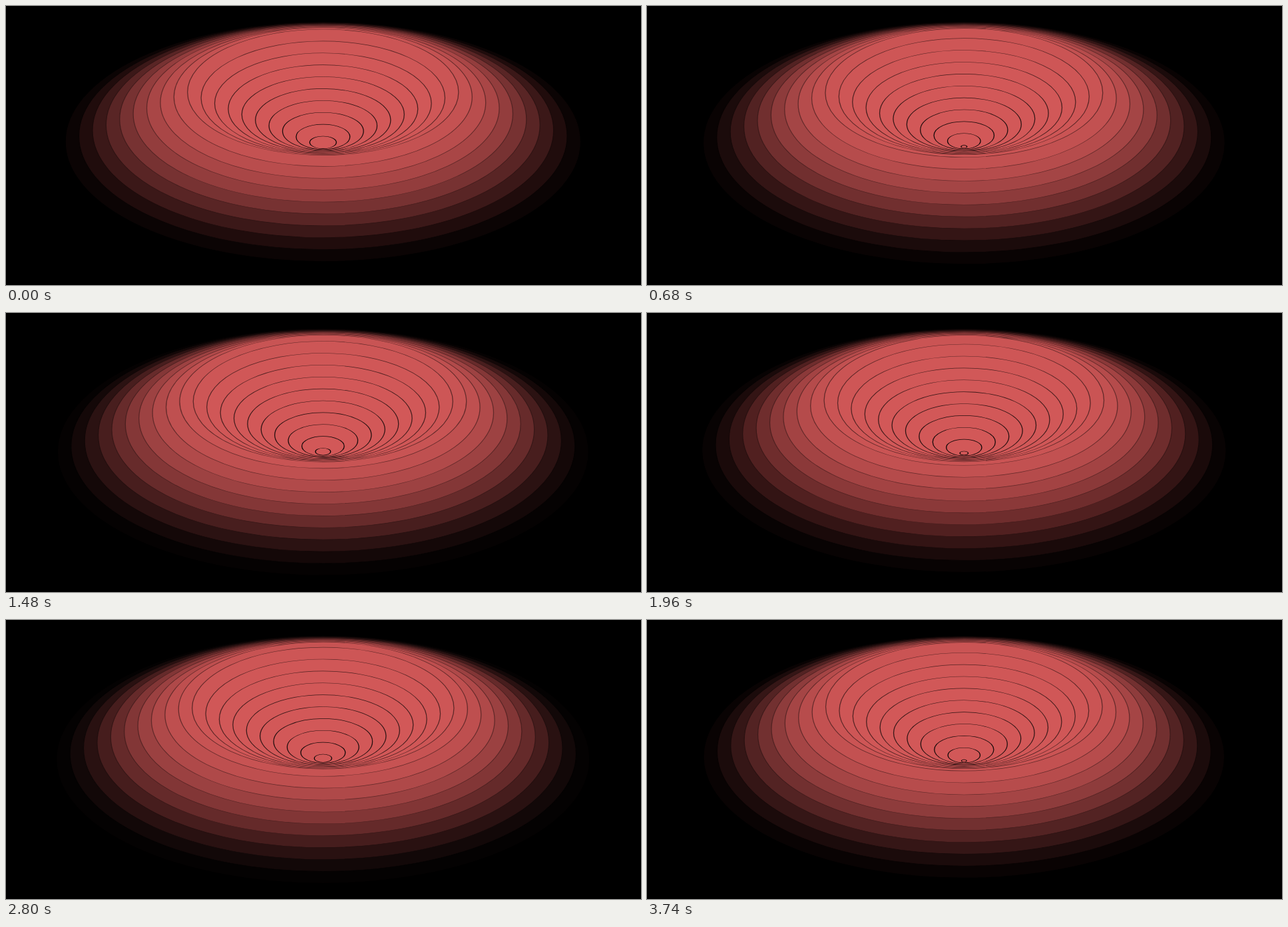
These frames come from a looping animation (954 px wide and 420 px high, 3790 ms). An HTML page:

```html
<!DOCTYPE html>
<html lang="en">
<head>
<meta charset="utf-8">
<title>Ring funnel</title>
<style>
  html, body { margin: 0; width: 100%; height: 100%; overflow: hidden; background: #000; }
  svg { display: block; width: 100vw; height: 100vh; }
</style>
</head>
<body>
<svg viewBox="0 0 954 420">
  <g id="rings" fill="#d35959" stroke="#000" stroke-width="1.3"></g>
</svg>
<script>
const LOOP = 3790, FIRST = 30, STEP = 46.7, LAST = 80;
const COUNT = 20, GAP = 20.4, MAX = COUNT * GAP;
const CX = 476.3, BASE = 213.5, RIDGE = 205, SLOPE = 0.411, TILT = 0.4657;

// step number and total outward travel in pixels
const KNOTS = [[1, 5.2], [8, 15.6], [22, 37.1], [32, 52.2], [53, 84.2], [68, 106.6], [80, 126.2]];

const group = document.getElementById('rings');
const rings = Array.from({ length: COUNT }, () =>
  group.appendChild(document.createElementNS('http://www.w3.org/2000/svg', 'circle')));

function travel(t) {
  if (t < FIRST) return 20;
  const step = Math.min(LAST, Math.floor((t - FIRST) / STEP) + 1);
  const k = KNOTS.findIndex(([s]) => s >= step);
  if (k === 0) return KNOTS[0][1];
  const [s0, p0] = KNOTS[k - 1], [s1, p1] = KNOTS[k];
  return p0 + (p1 - p0) * (step - s0) / (s1 - s0);
}

function draw(t) {
  const phase = travel(t) % GAP;
  // largest ring first, so smaller ones stack on top of it
  rings.forEach((ring, i) => {
    const r = phase + (COUNT - 1 - i) * GAP;
    const y = BASE - SLOPE * Math.min(r, 2 * RIDGE - r);
    ring.setAttribute('r', r.toFixed(2));
    ring.setAttribute('opacity', (1 - r / MAX).toFixed(4));
    ring.setAttribute('transform', `translate(${CX} ${y.toFixed(2)}) scale(1 ${TILT})`);
  });
}

const start = performance.now();
function tick() {
  draw((performance.now() - start) % LOOP);
  requestAnimationFrame(tick);
}
draw(0);
requestAnimationFrame(tick);
</script>
</body>
</html>
```
